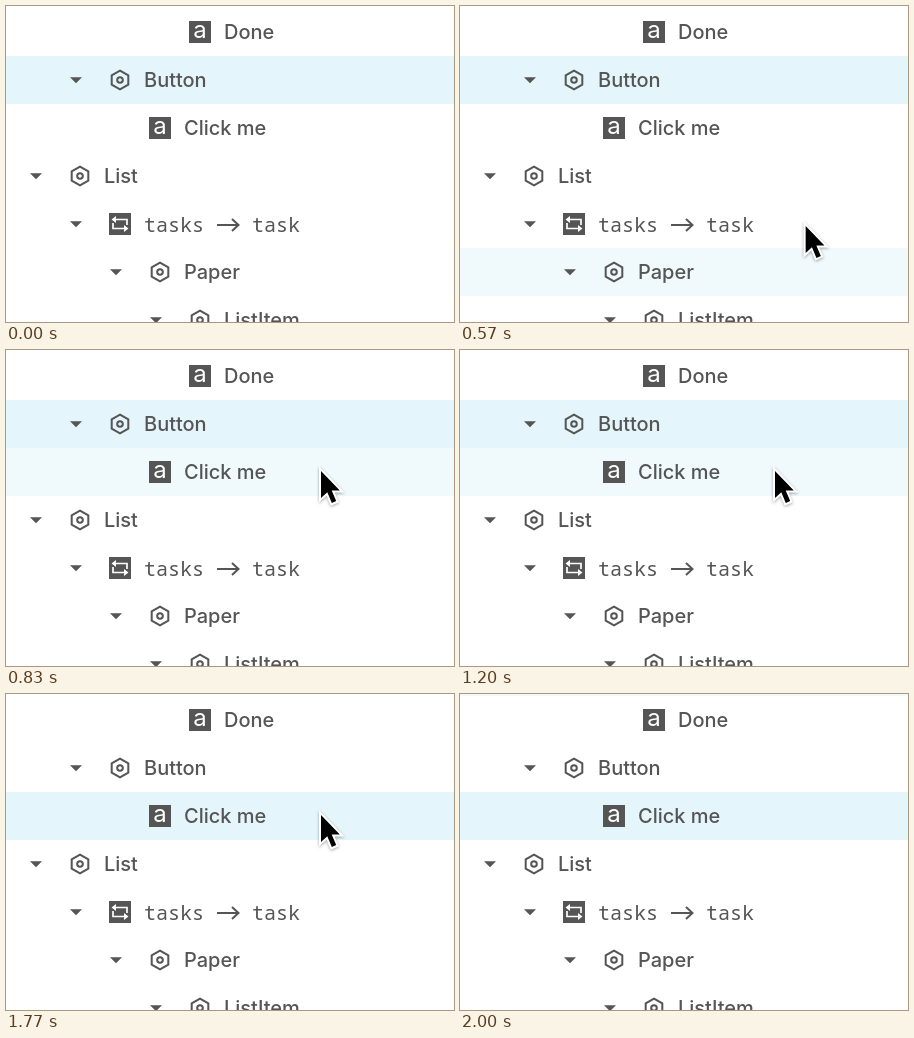
An HTML page for the animation above (2.71 s loop, 448x316 px).

```html
<!DOCTYPE html>
<html>
<head>
<meta charset="utf-8">
<style>
html, body { margin: 0; width: 100%; height: 100%; overflow: hidden; background: #fff; }
svg { display: block; }
text { font: 500 20px Inter, sans-serif; fill: #555; white-space: pre; }
.mono { font: 400 20px "Noto Sans Mono", monospace; }
.glyph { font: 400 24px Inter, sans-serif; fill: #fff; text-anchor: middle; }
.line { fill: none; stroke: #555; stroke-width: 2; }
.white { fill: none; stroke: #fff; stroke-width: 1.7; }
#cursor { filter: drop-shadow(0 1.5px 1.5px rgba(0, 0, 0, .35)); }
</style>
</head>
<body>
<svg width="448" height="316" viewBox="0 0 448 316">
  <rect id="hover" width="448" height="48" fill="#f0f9fc"/>
  <rect id="selected" width="448" height="48" fill="#e4f6fb"/>
  <g id="tree"></g>
  <g id="cursor">
    <path d="M0 0V27L6.3 21.3L10.8 32L15.2 30.1L10.7 19.6H18.8Z" fill="#000" stroke="#fff" stroke-width="4" paint-order="stroke"/>
  </g>
</svg>
<script>
const LOOP = 2710, STEP = 100 / 3, ROW = 48, TOP = 2;
const get = id => document.getElementById(id);

// Icons are drawn around their centre.
const icons = {
  text: '<rect x="-11" y="-11" width="22" height="22" fill="#555"/><text class="glyph" y="6.3">a</text>',
  node: '<path class="line" d="M0-9.4L8.3-4.7V4.7L0 9.4L-8.3 4.7V-4.7Z"/><circle class="line" r="2.8"/>',
  repeat: '<rect x="-11" y="-11" width="22" height="22" fill="#555"/>' +
    '<path class="white" d="M-5-4.5H7V1M5 4.5H-7V-1"/>' +
    '<path d="M-8.5-4.5L-4-8V-1ZM8.5 4.5L4 8V1Z" fill="#fff"/>'
};
const caret = '<path d="M-6-2.8H6L0 3.2Z" fill="#555"/>';
const arrow = '<path class="line" stroke-width="1.7" d="M211 219H232.5M226 213L232.5 219L226 225"/>';

const rows = [
  ['text', 194, 'Done'],
  ['node', 114, 'Button'],
  ['text', 154, 'Click me'],
  ['node', 74, 'List'],
  ['repeat', 114, 'tasks    task'],
  ['node', 154, 'Paper'],
  ['node', 194, 'ListItem']
];
const at = (x, y, shape) => `<g transform="translate(${x} ${y})">${shape}</g>`;

get('tree').innerHTML = rows.map(([kind, x, label], i) => {
  const y = 26 + i * ROW, mono = kind === 'repeat';
  return at(x, y, icons[kind]) +
    (kind === 'text' ? '' : at(x - 44, y, caret)) +
    `<text x="${x + 24}" y="${y + (mono ? 8 : 7)}" class="${mono ? 'mono' : ''}">${label}</text>` +
    (mono ? arrow : '');
}).join('');

// Pointer tip at a step of 1/30 s: glide in, rest, leave at the top.
function tip(k) {
  if (k < 53) {
    const left = Math.max(0, (25 - k) / 10);
    return [315 + 46 * left ** 1.82, 121 + 158 * left ** 2.1];
  }
  const u = Math.min(1, (k - 53) / 7);
  return [315 + 18 * u, 121 - 165 * u ** 1.6];
}

function place(id, row) {
  get(id).setAttribute('y', TOP + ROW * row);
}

function draw(now) {
  const k = Math.floor((now % LOOP + 4) / STEP);
  const [x, y] = tip(k);
  const shown = k >= 15 && k < 60;
  get('cursor').setAttribute('transform', `translate(${x} ${y})`);
  get('cursor').style.display = shown ? '' : 'none';
  // The highlight trails the pointer by one step.
  place('hover', k < 15 ? -2 : Math.floor((tip(Math.min(k, 60) - 1)[1] - TOP) / ROW));
  place('selected', k < 37 ? 1 : 2);
  requestAnimationFrame(draw);
}
draw(0);
</script>
</body>
</html>
```
